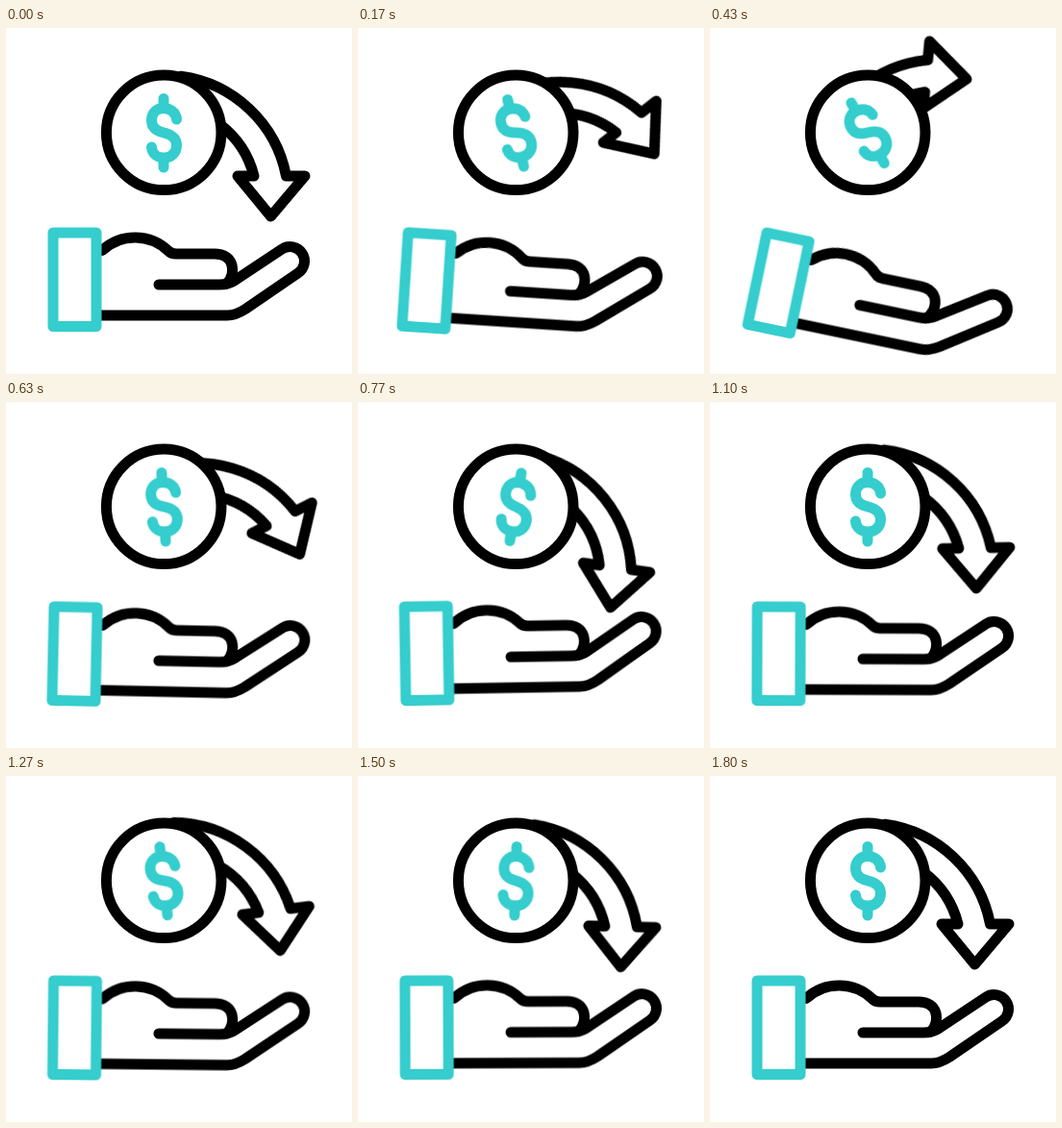
An HTML page without scripts that plays this animation: 360 by 360 pixels, repeating every 2000 ms.

```html
<!DOCTYPE html>
<html lang="en">
<head>
<meta charset="utf-8">
<title>Receive money</title>
<style>
  html, body { margin: 0; width: 100%; height: 100%; overflow: hidden; background: #fff; }
  svg { display: block; width: 100vw; height: 100vh; }

  .line { fill: none; stroke: #000; stroke-width: 11; stroke-linecap: round; stroke-linejoin: round; }
  .teal { stroke: #35cdcd; }

  .lift, .swing, .sign, .hand { animation: 2s cubic-bezier(.37, 0, .63, 1) infinite; }
  .lift { animation-name: lift; }
  .swing { animation-name: swing; transform-origin: 164px 109px; }
  .sign { animation-name: sign; transform-origin: 164px 109px; }
  .hand { animation-name: hand; transform-origin: 54px 262px; }

  @keyframes lift {
    0% { transform: translate(0, 0); animation-timing-function: cubic-bezier(.27, 0, .5, 1); }
    21.5% { transform: translate(6px, 47px); animation-timing-function: cubic-bezier(.32, 0, .58, 1); }
    42.5%, 100% { transform: translate(0, 0); }
  }
  @keyframes swing {
    0% { transform: rotate(0deg); animation-timing-function: cubic-bezier(.29, 0, .52, 1); }
    21.5% { transform: rotate(-84.8deg); animation-timing-function: cubic-bezier(.35, .18, .55, 1); }
    42.5% { transform: rotate(13deg); }
    62.5% { transform: rotate(-7.2deg); }
    76% { transform: rotate(1.5deg); }
    90%, 100% { transform: rotate(0deg); }
  }
  @keyframes sign {
    0% { transform: rotate(0deg); animation-timing-function: cubic-bezier(.27, 0, .5, 1); }
    21.5% { transform: rotate(-28.7deg); animation-timing-function: cubic-bezier(.3, .2, .5, 1); }
    43.5% { transform: rotate(12deg); }
    63% { transform: rotate(-6.5deg); }
    76% { transform: rotate(2deg); }
    90%, 100% { transform: rotate(0deg); }
  }
  @keyframes hand {
    0% { transform: rotate(0deg); animation-timing-function: cubic-bezier(.45, 0, .56, 1); }
    21.5% { transform: rotate(11.8deg); animation-timing-function: cubic-bezier(.28, .2, .32, 1); }
    40% { transform: rotate(-1deg); }
    62.5% { transform: rotate(.6deg); }
    76% { transform: rotate(-.2deg); }
    90%, 100% { transform: rotate(0deg); }
  }
</style>
</head>
<body>
<svg viewBox="0 0 360 360">
  <g class="hand line">
    <path d="M100 231.5C120 213 150 214 169 232Q172 235 177 235H217C237 235 240 254 230 266"/>
    <path d="M159 267H222Q232 267 239 262L287.2 230A15 15 0 1 1 303.8 255L249 292.5Q239 299 230 299H98"/>
    <rect class="teal" x="49" y="213" width="45" height="97.5" fill="#fff"/>
  </g>

  <g class="lift">
    <path class="swing line" d="M182 50.3A129.3 129.3 0 0 1 291.5 154H311L275.5 196L241 154H258A97 97 0 0 0 222 100"/>
  </g>

  <circle cx="164.2" cy="108.8" r="59.8" fill="#fff" stroke="#000" stroke-width="11"/>
  <path class="sign line teal" d="M164 73.5V83M164 136V145M177.5 95C176 80 151.5 79 151.5 96C151.5 106 160 108 164.5 109C172 111 177.5 114 177.5 122C177.5 139 152.5 139 151.5 124"/>
</svg>
</body>
</html>
```
